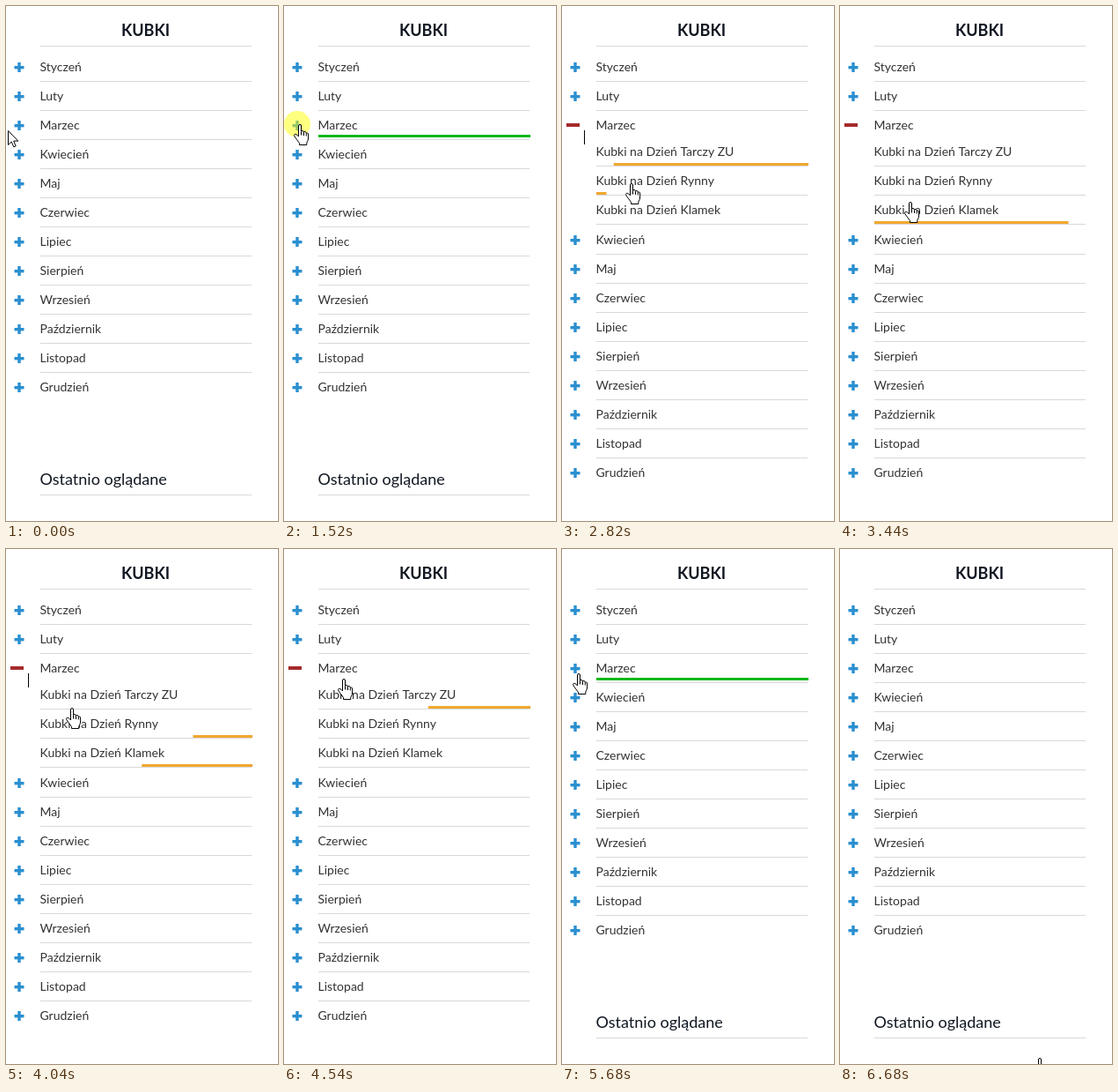
These frames come from a looping animation (309 px wide and 584 px high, 6.78 s). An HTML page with a canvas:

```html
<!DOCTYPE html>
<html lang="pl">
<head>
<meta charset="utf-8">
<title>Kubki</title>
<style>
html, body { margin: 0; width: 100%; height: 100%; overflow: hidden; background: #fff; }
canvas { display: block; width: 309px; height: 584px; }
</style>
</head>
<body>
<canvas id="stage"></canvas>
<script>
const W = 309, H = 584, LOOP = 6780;
const TICKS = 67, TICK = LOOP / TICKS;          // the screen refreshes once per tick
const OPEN_CLICK = 15 * TICK, CLOSE_CLICK = 55 * TICK;
const LEFT = 39, RULE = 240, BAR = 241, ROW = 33, SHIFT = 97;
const FADE = 300, LINK_HEIGHT = 27, BLINK = 530;
const INK = '#333', TITLE = '#111722', GREEN = '#10b81a', AMBER = '#f0a830';
const months = ['Styczeń', 'Luty', 'Marzec', 'Kwiecień', 'Maj', 'Czerwiec', 'Lipiec',
  'Sierpień', 'Wrzesień', 'Październik', 'Listopad', 'Grudzień'];
const mugs = ['Tarczy ZU', 'Rynny', 'Klamek'].map(s => 'Kubki na Dzień ' + s);

// Pointer key points: time, x, y
const route = [
  [100, 2, 141], [800, 17, 134], [1750, 17, 134],     // to the plus, click
  [2420, 75, 167], [2804, 78, 179], [2834, 78, 201],  // down the list
  [3120, 79, 217], [3938, 78, 230], [4048, 74, 180],  // and back up
  [4554, 67, 147], [5160, 18, 141], [5980, 18, 141],  // to the minus, click
  [6420, 45, 147], [6578, 205, 551], [6680, 226, 577] // away
];

const canvas = document.getElementById('stage');
const ctx = canvas.getContext('2d');
const dpr = window.devicePixelRatio || 1;
canvas.width = W * dpr;
canvas.height = H * dpr;

const arrow = new Path2D('M.5 .5V16.5L4.2 13L6.8 18.8L9.2 17.8L6.7 12.1H11.8Z');
const hand = new Path2D('M5.5 14V2Q5.5 .5 7 .5Q8.5 .5 8.5 2V8.5Q8.9 7.4 10 7.5Q11.5 7.6 11.5 9.3' +
  'Q12 8.3 13 8.5Q14.3 8.8 14.3 10.4Q15 9.7 15.8 10Q16.6 10.4 16.6 12V16Q16.4 19 14.8 21V23.5' +
  'H6.5V21.5Q4 18 1 14Q0 12 1.2 11.4Q2.8 11 4 12.3Z');
const seams = new Path2D('M8.5 8.5V12.5M11.5 9.3V13M14.3 10.4V13.5');

const clamp = x => Math.max(0, Math.min(1, x));
const isOpen = t => t > OPEN_CLICK + TICK / 2 && t < CLOSE_CLICK + TICK / 2;
const onLink = x => x >= 10;

// The CSS "ease" curve
function ease(x) {
  if (x <= 0 || x >= 1) return clamp(x);
  const curve = (u, p, q) => 3 * (1 - u) * (1 - u) * u * p + 3 * (1 - u) * u * u * q + u * u * u;
  let lo = 0, hi = 1;
  for (let i = 0; i < 24; i++) {
    const mid = (lo + hi) / 2;
    if (curve(mid, .25, .25) < x) lo = mid; else hi = mid;
  }
  return curve(lo, .1, 1);
}

function pointer(t) {
  let i = 0;
  while (i < route.length - 2 && route[i + 1][0] <= t) i++;
  const [a, ax, ay] = route[i], [b, bx, by] = route[i + 1];
  const k = clamp((t - a) / (b - a));
  return [ax + (bx - ax) * k, ay + (by - ay) * k];
}

function layout(open) {
  const main = months.map((name, i) => {
    const y = 69 + ROW * i + (open && i > 2 ? SHIFT : 0);
    return { name, y, top: y - 15, bar: y + 11, color: GREEN, minus: open && i === 2 };
  });
  const subs = mugs.map((name, i) => {
    const y = 165 + ROW * i;
    return { name, y, top: y - 12, bar: y + 13, color: AMBER, sub: true };
  });
  return open ? main.concat(subs) : main;
}

const pages = { true: layout(true), false: layout(false) };

// Follow the pointer once to learn when each link is hovered
function findVisits() {
  const visits = [];
  let current = null;
  for (let t = 0; t < LOOP; t++) {
    const [x, y] = pointer(t);
    const link = onLink(x) && pages[isOpen(t)].find(l => y >= l.top && y < l.top + LINK_HEIGHT);
    if (current && (!link || link.bar !== current.bar)) {
      current.leave = t;
      current = null;
    }
    if (link && !current) {
      current = { bar: link.bar, color: link.color, enter: t, leave: LOOP };
      visits.push(current);
    }
  }
  return visits;
}

const visits = findVisits();

function rect(x, y, w, h, color) {
  ctx.fillStyle = color;
  ctx.fillRect(x, y, w, h);
}

function text(s, x, y, font, color) {
  ctx.font = font + ' Lato, sans-serif';
  ctx.fillStyle = color;
  ctx.fillText(s, x, y);
}

const rule = y => rect(LEFT, y, RULE, 1, '#d8d8d8');

function plus(y) {
  rect(9.5, y - 1, 11, 3.4, '#2a8fd0');
  rect(13.3, y - 5, 3.4, 11, '#2a8fd0');
}

function drawPage(open) {
  rect(0, 0, W, H, '#fff');
  ctx.textAlign = 'center';
  text('KUBKI', 158.5, 34, 'bold 18px', TITLE);
  ctx.textAlign = 'left';
  rule(45);
  for (const { name, y, sub, minus } of pages[open]) {
    text(name, LEFT - .5, y + 5, '14px', INK);
    if (minus) rect(5, y - 2, 15, 4, '#a52a2a');
    else if (!sub) plus(y);
    if (name !== months[11] && !minus) rule(y + (sub ? 16.5 | 0 : 16));
  }
  const drop = open ? SHIFT : 0;
  text('Ostatnio oglądane', LEFT - .5, 543 + drop, '18px', TITLE);
  rule(554 + drop);
}

// Grows from the left on hover, shrinks to the right afterwards
function drawBar({ bar, color, enter, leave }, t) {
  const grown = ease((Math.min(t, leave) - enter) / FADE);
  const width = BAR * grown * (1 - ease((t - leave) / FADE));
  if (width > 3) rect(t > leave ? LEFT + BAR - width : LEFT, bar, width, 3, color);
}

function drawPointer(t) {
  const [x, y] = pointer(t).map(Math.round);
  if ([OPEN_CLICK, CLOSE_CLICK].some(c => Math.abs(t - c) < TICK / 2)) {
    ctx.fillStyle = 'rgba(255, 255, 0, .5)';
    ctx.beginPath();
    ctx.arc(x - 2, y, 15, 0, 2 * Math.PI);
    ctx.fill();
  }
  const link = onLink(x);
  const shape = link ? hand : arrow;
  ctx.save();
  ctx.translate(link ? x - 6 : x, y);
  ctx.fillStyle = '#fff';
  ctx.strokeStyle = '#000';
  ctx.lineJoin = 'round';
  ctx.fill(shape);
  ctx.stroke(shape);
  if (link) ctx.stroke(seams);
  ctx.restore();
}

function draw(t) {
  const open = isOpen(t);
  ctx.setTransform(dpr, 0, 0, dpr, 0, 0);
  drawPage(open);
  visits.forEach(v => drawBar(v, t));
  if (open && (t - OPEN_CLICK + 60) % (2 * BLINK) < BLINK) rect(25, 141, 1, 16, '#000');
  drawPointer(t);
}

const start = performance.now();
function loop() {
  const t = (performance.now() - start) % LOOP;
  draw(Math.min(TICKS - 1, Math.floor((t + 18) / TICK)) * TICK);
  requestAnimationFrame(loop);
}
loop();
</script>
</body>
</html>
```
